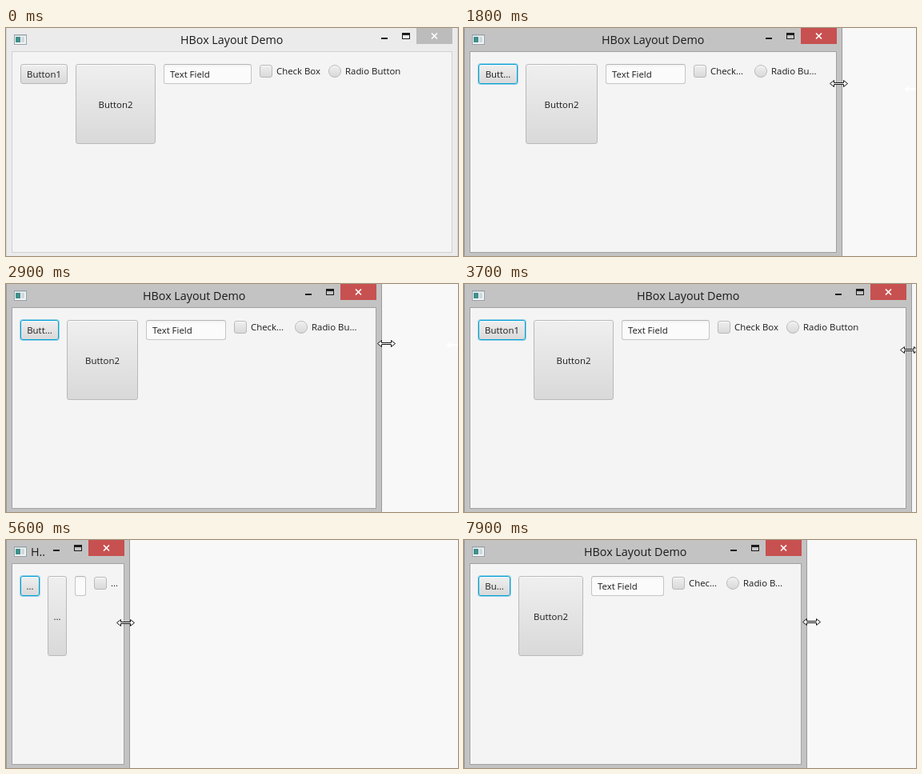
Animation, 565 px wide and 285 px high, one loop 8 s. Source, as an HTML page:

```html
<!DOCTYPE html>
<html lang="en">
<head>
<meta charset="utf-8">
<title>HBox Layout Demo</title>
<style>
  html, body { margin: 0; width: 100%; height: 100%; overflow: hidden; background: #f8f8f8; }
  body { position: relative; font: 11.4px "Open Sans", sans-serif; color: #1a1a1a; }
  div, svg { position: absolute; box-sizing: border-box; white-space: pre; }
  #win { left: 0; top: -2px; height: 290px; background: #ebebeb; border: 1px solid #d4d4d4; }
  #win.active { background: #c3c3c3; border-color: #9a9a9a; }
  #bar { left: 0; top: 0; height: 29px; overflow: hidden; }
  #icon { left: 10px; top: 8px; }
  #title { top: 4px; height: 21px; line-height: 21px; font-size: 14.3px; overflow: hidden; }
  #min { top: 12px; width: 8px; height: 2px; background: #1c1c1c; }
  #max { top: 6px; width: 10px; height: 8px; border: 1px solid #1c1c1c; border-top-width: 3px; }
  #close { top: 0; width: 45px; height: 20px; background: #bcbcbc; }
  .active ~ #bar #close { background: #c75050; }
  #pane { left: 7px; top: 29px; height: 252px; overflow: hidden; background: #f4f4f4; border: 1px solid #d2d2d2; }
  .active ~ #pane { border-color: #a2a2a2; }
  .btn, .mark { background: linear-gradient(#efefef, #d9d9d9); border: 1px solid #b9b9b9; border-radius: 3px; box-shadow: inset 0 1px #fafafa; }
  .btn, #field { top: 15px; height: 25px; line-height: 23px; overflow: hidden; }
  .btn { text-align: center; }
  #b2 { height: 100px; line-height: 100px; }
  .focus { border-color: #039ed3; box-shadow: 0 0 0 1px #039ed366, inset 0 1px #fafafa; }
  #field { background: linear-gradient(#f3f3f3, #fbfbfb 4px); border: 1px solid #c4c4c4; border-top-color: #b4b4b4; border-radius: 3px; }
  #field div { left: 7px; right: 7px; top: 0; height: 23px; overflow: hidden; }
  .opt { top: 15px; height: 18px; line-height: 18px; padding-left: 21px; }
  .mark { left: 0; top: 1px; width: 16px; height: 16px; }
  .round { border-radius: 50%; }
</style>
</head>
<body>
<svg id="trail" width="23" height="9" style="left:550px;top:72px"><path fill="#fff"/></svg>
<div id="win"></div>
<div id="bar">
  <svg id="icon" width="16" height="13">
    <rect x=".5" y=".5" width="15" height="12" fill="#f3f5f6" stroke="#98a3aa"/>
    <path d="M1 1.5H15" stroke="#c5cdd2"/>
    <rect x="2" y="3" width="6" height="7" fill="#3f8f8b"/>
    <rect x="9" y="3" width="4" height="7" fill="#cfd9dc"/>
  </svg>
  <div id="title"></div>
  <div id="min"></div>
  <div id="max"></div>
  <div id="close"><svg width="45" height="20"><path d="M19 6.5L26 13.5M26 6.5L19 13.5" stroke="#fff" stroke-width="1.7"/></svg></div>
</div>
<div id="pane">
  <div id="b1" class="btn"></div>
  <div id="b2" class="btn"></div>
  <div id="field"><div>Text Field</div></div>
  <div id="check" class="opt"><div class="mark"></div><span></span></div>
  <div id="radio" class="opt"><div class="mark round"></div><span></span></div>
</div>
<svg id="cursor" width="23" height="9"><path fill="#fff" stroke="#111"/></svg>
<script>
const $ = id => document.getElementById(id);
const STEP = 100, COUNT = 80;

const linear = p => p;
const easeIn = p => p ** 1.4;
const easeOut = p => 1 - (1 - p) ** 1.7;
const settle = p => 1 - (1 - p) ** 3;
const smooth = p => p * p * (3 - 2 * p);

// The drag: when it gets there, window width, pointer height, easing on the way
const drag = [
  { at: 0, w: 565, y: 76.5 },
  { at: 13, w: 565, y: 76.5, ease: linear },
  { at: 18, w: 473, y: 69.5, ease: smooth },
  { at: 26, w: 387, y: 71, ease: smooth },
  { at: 27, w: 387, y: 71, ease: linear },
  { at: 29, w: 470, y: 74.5, ease: easeIn },
  { at: 37, w: 560, y: 82.5, ease: settle },
  { at: 38, w: 560, y: 82.5, ease: linear },
  { at: 47, w: 332, y: 91.5, ease: easeIn },
  { at: 57, w: 151, y: 103.5, ease: easeOut },
  { at: 59, w: 151, y: 103.5, ease: linear },
  { at: 64, w: 140, y: 104, ease: smooth },
  { at: 68, w: 140, y: 104, ease: linear },
  { at: 71, w: 153, y: 103.5, ease: easeIn },
  { at: 80, w: 463, y: 102, ease: linear }
];

function dragAt(k) {
  const i = drag.findIndex(d => d.at > k);
  const a = drag[i - 1], b = drag[i];
  const p = b.ease((k - a.at) / (b.at - a.at));
  return { w: a.w + (b.w - a.w) * p, y: a.y + (b.y - a.y) * p };
}

const arrow = "M.5 4.5L5.5 .5V3.5H17.5V.5L22.5 4.5L17.5 8.5V5.5H5.5V8.5Z";
document.querySelectorAll("#trail path, #cursor path").forEach(p => p.setAttribute("d", arrow));

const pen = document.createElement("canvas").getContext("2d");
function textWidth(text, size) {
  pen.font = size + 'px "Open Sans", sans-serif';
  return pen.measureText(text).width;
}

function shorten(text, room, size = 11.4, keep = 0) {
  let n = text.length - 1;
  const cut = () => text.slice(0, n).trim() + "...";
  while (n > keep && textWidth(cut(), size) > room) n--;
  return cut();
}

function place(id, x, w) {
  $(id).style.left = x + "px";
  if (w !== undefined) $(id).style.width = Math.max(0, w) + "px";
}

function layoutTitle(w) {
  const text = "HBox Layout Demo", size = 14.3, full = textWidth(text, size);
  const center = w < 338 ? (w - 78) / 2 : w / 2;
  const x = Math.max(31, Math.round(center - full / 2));
  const room = w - 107 - x;
  $("title").textContent = full <= room ? text : shorten(text, room, size, 1);
  place("title", x, room);
}

const items = [
  { id: "b1", pref: 59, least: 24.3, text: "Button1", room: w => w - 16 },
  { id: "b2", pref: 100, least: 24, text: "Button2", room: w => w - 16 },
  { id: "field", pref: 110.3, least: 14 },
  { id: "check", pref: 76.4, least: 30, text: "Check Box", room: w => w - 21.8 },
  { id: "radio", pref: 93.3, least: 30, text: "Radio Button", room: w => (w - 21) * .97 }
];

// Shrink all items equally, then take what is left from the last ones
function shrinkItems(w) {
  let lack = Math.max(0, 523 - w);
  const share = lack / items.length;
  const take = (item, want) => {
    const cut = Math.min(want, item.w - item.least);
    item.w -= cut;
    lack -= cut;
  };
  for (const item of items) {
    item.w = item.pref;
    take(item, share);
  }
  for (const item of [...items].reverse()) take(item, lack);
}

function layoutItems(w) {
  shrinkItems(w);
  let x = 10;
  for (const item of items) {
    const left = Math.floor(x);
    place(item.id, left, Math.floor(x + item.w) - left);
    x += item.w + 10;
    if (!item.text) continue;
    const room = item.room(item.w);
    const fits = item.w >= item.pref || textWidth(item.text, 11.4) <= room;
    const label = $(item.id).querySelector("span") || $(item.id);
    label.textContent = fits ? item.text : shorten(item.text, room);
  }
}

// The pointer runs slightly ahead of the window edge
function movePointer(k) {
  place("cursor", Math.round(dragAt(k + .28).w - 15.5));
  $("cursor").style.top = Math.round(dragAt(k).y - 4.5) + "px";
}

function draw(k) {
  const w = Math.round(dragAt(k).w);
  const active = k >= 8;
  $("win").className = active ? "active" : "";
  $("b1").className = active ? "btn focus" : "btn";
  $("cursor").style.display = k >= 4 ? "" : "none";
  $("trail").style.display = k >= 14 && k < 37 ? "" : "none";
  place("win", 0, w);
  place("bar", 0, w);
  place("pane", 7, w - 14);
  place("min", w - 96);
  place("max", w - 70);
  place("close", w - 52);
  layoutTitle(w);
  layoutItems(w);
  movePointer(k);
}

const began = performance.now();
let shown = -1;
function tick() {
  const k = Math.floor((performance.now() - began) / STEP) % COUNT;
  if (k !== shown) draw(shown = k);
  requestAnimationFrame(tick);
}
tick();
</script>
</body>
</html>
```
